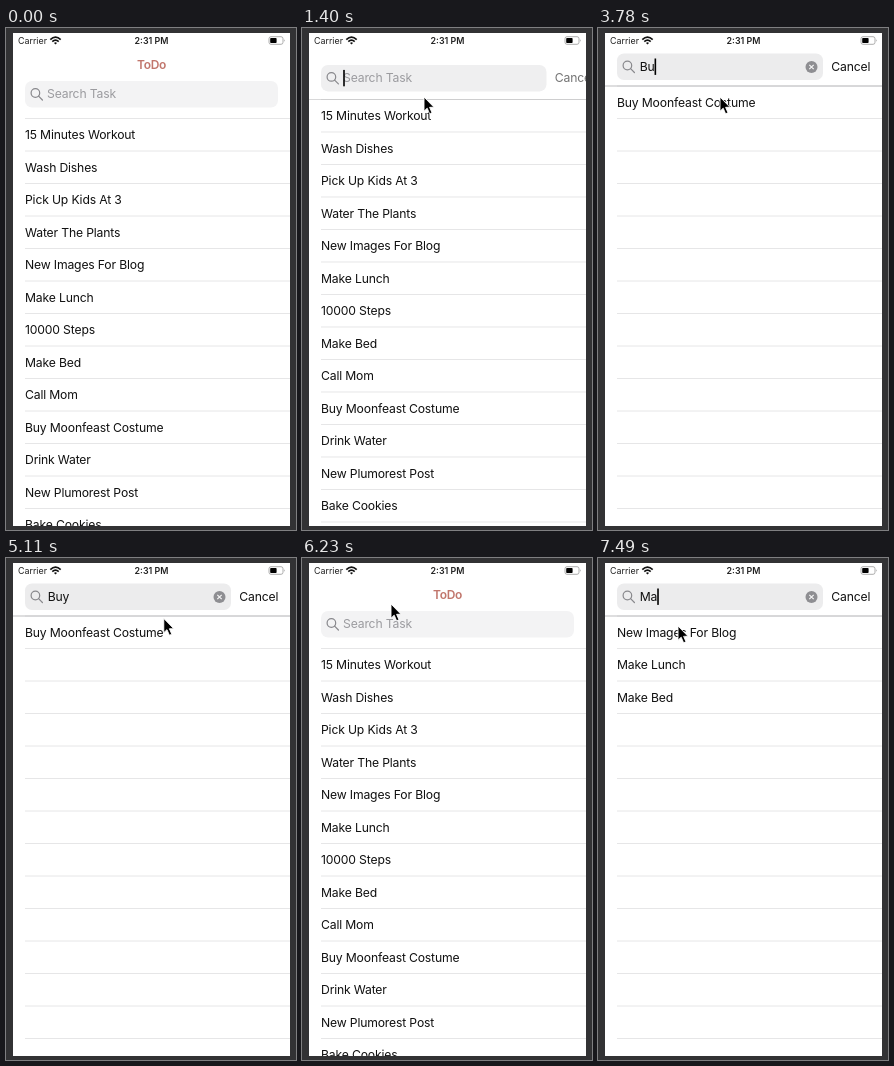
An HTML page for the animation above (8 s loop, 290 px wide and 502 px high).

```html
<!DOCTYPE html>
<html lang="en">
<head>
<meta charset="utf-8">
<title>ToDo search</title>
<style>
  html, body { margin: 0; width: 100%; height: 100%; overflow: hidden; background: #323234; }
  svg { display: block; }
  text { font: 12.2px Inter, Roboto, sans-serif; letter-spacing: -.17px; fill: #111; white-space: pre; }
  .status { font-size: 8.9px; letter-spacing: 0; fill: #222; }
  .bold { font-weight: 600; }
  #title { font-size: 12px; letter-spacing: -.3px; fill: #c1766c; }
  #hint { fill: #9b9b9f; }
  .rule { stroke: #e6e6e7; }
</style>
</head>
<body>
<svg width="290" height="502" viewBox="0 0 290 502">
  <svg x="7" y="5" width="277" height="493" viewBox="7 5 277 493">
    <rect x="7" y="5" width="277" height="493" fill="#fff"/>

    <text class="status" x="12" y="16">Carrier</text>
    <g fill="none" stroke="#111" stroke-width="1.7">
      <path d="M44.3 11.6Q49.5 6.6 54.7 11.6M46.3 13.7Q49.5 10.7 52.7 13.7"/>
      <path d="M48 14.9Q49.5 13.6 51 14.9L49.5 16.6Z" fill="#111" stroke="none"/>
    </g>
    <text class="status bold" x="145.5" y="16" text-anchor="middle">2:31 PM</text>
    <rect x="263" y="8.7" width="14" height="7.6" rx="2" fill="none" stroke="#999" stroke-width=".8"/>
    <rect x="264.2" y="9.9" width="6.4" height="5.2" rx=".8"/>
    <path d="M278.2 11.2q1.4 1.3 0 2.6z" fill="#999"/>

    <text id="title" class="bold" x="145.5" y="40.7" text-anchor="middle">ToDo</text>

    <g id="list"></g>

    <g id="bar">
      <rect id="field" x="19" width="253" height="26.5" rx="7"/>
      <g fill="none" stroke="#88888c" stroke-width="1.2">
        <circle cx="29.4" cy="12" r="4.3"/>
        <path d="M32.6 15.2L36.4 19" stroke-linecap="round"/>
      </g>
      <text id="hint" x="41" y="17.4">Search Task</text>
      <text id="query" x="41.7" y="17.4"></text>
      <rect id="caret" y="5" width="1.6" height="16.4"/>
      <g id="clear">
        <circle r="6" fill="#8e8e92"/>
        <path d="M-2.2-2.2L2.2 2.2M2.2-2.2L-2.2 2.2" stroke="#f4f4f4" stroke-width="1.2"/>
      </g>
      <text id="cancel" y="17.4">Cancel</text>
    </g>
  </svg>
  <path id="pointer" d="M0 0V14.2L3.2 11.2L5.6 16.8L8 15.8L5.6 10.3H10Z" stroke="#fff" stroke-width=".9"/>
</svg>
<script>
const LOOP = 8000, TICK = 70, ROW = 32.5;
const TASKS = [
  "15 Minutes Workout", "Wash Dishes", "Pick Up Kids At 3", "Water The Plants",
  "New Images For Blog", "Make Lunch", "10000 Steps", "Make Bed", "Call Mom",
  "Buy Moonfeast Costume", "Drink Water", "New Plumorest Post", "Bake Cookies"
];
// time, typed text, start of the caret's blink cycle (none: not editing)
const EDITS = [
  [0, ""], [1190, "", 1330], [2170, "B", 2240], [3780, "Bu", 3780], [4340, "Buy", 4380],
  [5670, ""], [6790, "", 6930], [7350, "M", 7350], [7490, "Ma", 7560]
];
// time, x, y of the pointer tip
const PATH = [
  [70, 148, 478], [630, 122, 67], [770, 122, 69], [4900, 122, 69], [5530, 260, 36],
  [5810, 260, 36], [6230, 89, 46], [6440, 80, 68]
];

const $ = id => document.getElementById(id);
const set = (id, attrs) => {
  for (const key in attrs) $(id).setAttribute(key, attrs[key]);
};
const ramp = (t, a, b) => Math.min(1, Math.max(0, (t - a) / (b - a)));
const ease = (t, a, b) => { const x = ramp(t, a, b); return x * x * (3 - 2 * x); };

function pointerAt(t) {
  const i = PATH.findIndex(p => p[0] > t);
  if (i < 0) return PATH[PATH.length - 1].slice(1);
  if (i === 0) return PATH[0].slice(1);
  const [t0, x0, y0] = PATH[i - 1], [t1, x1, y1] = PATH[i], k = ease(t, t0, t1);
  return [x0 + (x1 - x0) * k, y0 + (y1 - y0) * k];
}

function showTasks(query) {
  const found = TASKS.filter(s => s.toLowerCase().includes(query.toLowerCase()));
  let out = "";
  for (let i = 0; i < 14; i++) {
    const y = i * ROW;
    out += `<path class="rule" d="M19 ${y}H284"/>`;
    if (found[i]) out += `<text x="19" y="${y + 20.8}">${found[i]}</text>`;
  }
  $("list").innerHTML = out + '<path id="edge" d="M7 0H284" stroke="#bdbdbf"/>';
}

let shown = null;

function draw(t) {
  const [, query, blink] = EDITS.filter(e => e[0] <= t).pop();
  if (query !== shown) {
    showTasks(query);
    $("query").textContent = query;
    shown = query;
  }

  // 0: title shown, 1: search active
  const p = ease(t, 1180, 1575) - ease(t, 5730, 6125) + ease(t, 6780, 7175);
  const right = 272 - 47 * p, grey = 243 - 7 * p;
  const closing = t >= 5670 && t < 6500;

  set("title", { opacity: Math.max(0, 1 - 2.5 * p) });
  set("list", { transform: `translate(0 ${90.5 - ROW * p})` });
  set("edge", { opacity: p });
  set("bar", { transform: `translate(0 ${53 - 27.5 * p})` });
  set("field", { width: right - 19, fill: `rgb(${grey},${grey},${grey + 1})` });
  set("hint", { opacity: query ? 0 : 1 });
  set("clear", { transform: `translate(${right - 11.5} 13.5)`, opacity: query ? 1 : 0 });
  set("cancel", { x: right + 8.3, opacity: p * (closing ? .38 : 1) });

  const d = t - blink;
  set("caret", {
    x: 41.2 + (query ? $("query").getComputedTextLength() + .5 : 0),
    opacity: blink ? 1 - ramp(d, 450, 700) + ramp(d, 1000, 1190) : 0
  });
  set("pointer", { transform: `translate(${pointerAt(t)})`, opacity: t < 70 ? 0 : 1 });
}

const start = performance.now();
function frame() {
  const t = (performance.now() - start) % LOOP;
  draw(Math.floor(t / TICK) * TICK);
  requestAnimationFrame(frame);
}
frame();
</script>
</body>
</html>
```
